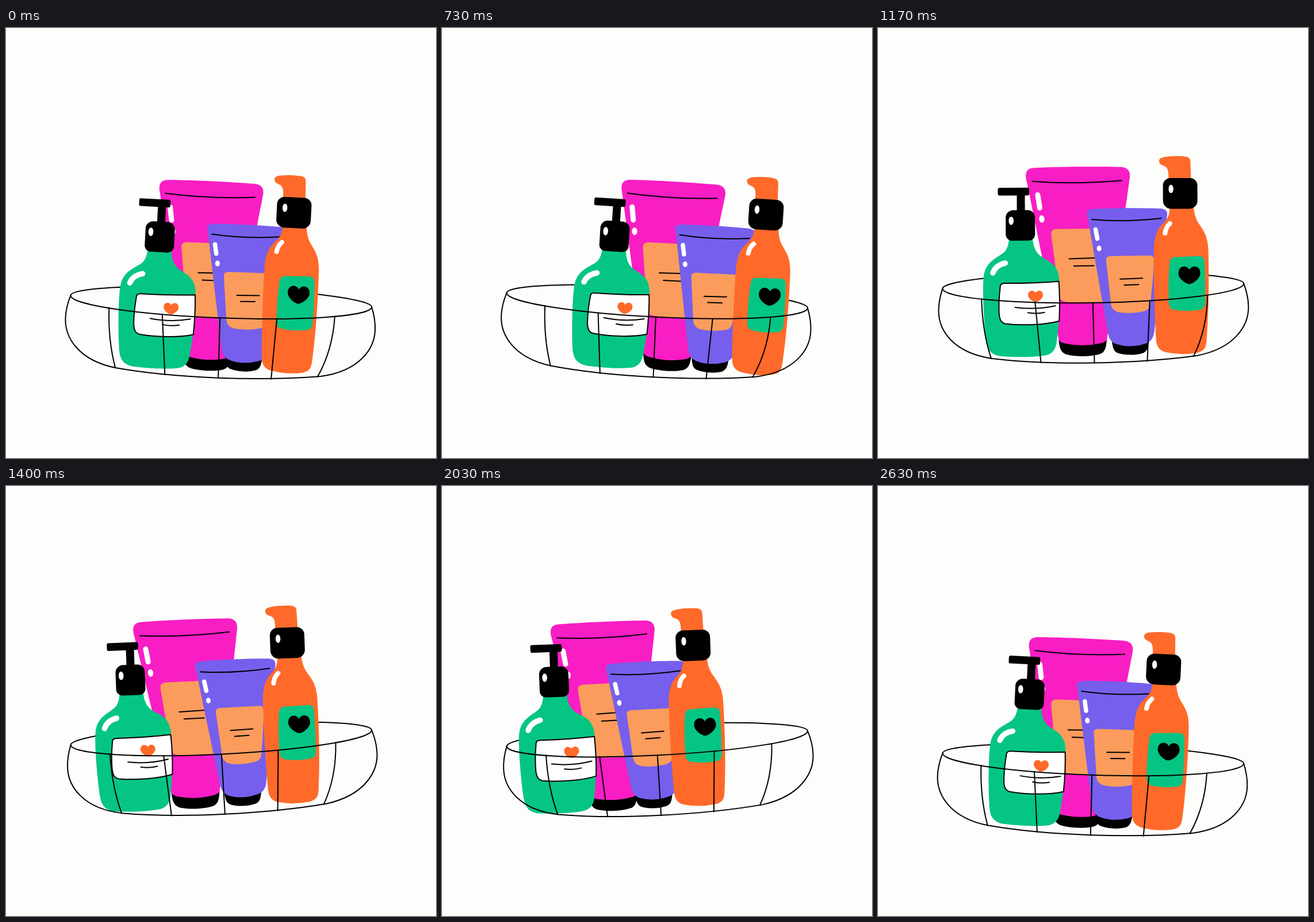
Write an HTML page with a canvas that moves like this. It is 748 px wide and 748 px high and loops after 2.66 s.

```html
<!DOCTYPE html>
<html lang="en">
<head>
<meta charset="utf-8">
<title>Rocking bowl</title>
<style>
  html, body { margin: 0; width: 100%; height: 100%; overflow: hidden; background: #fdfdfc; }
  canvas { display: block; width: 748px; height: 748px; }
</style>
</head>
<body>
<canvas id="stage" width="748" height="748"></canvas>
<script>
const ctx = document.getElementById('stage').getContext('2d');
const LOOP = 2660;
const CENTER = 374.3, REST_Y = 449.5, REST_TILT = -0.0134, RIM = 262;
const BLACK = '#000', WHITE = '#fff', GREEN = '#05c583', PINK = '#f81ec4',
      PURPLE = '#765fec', ORANGE = '#ff6a2a', PEACH = '#fb9c5c';

// Eased swing between two extremes, reached at times tHigh and tLow.
function swing(t, high, low, tHigh, tLow) {
  const since = (t - tHigh + LOOP) % LOOP;
  const fall = tLow - tHigh;
  const down = since < fall;
  const u = down ? since / fall : (since - fall) / (LOOP - fall);
  const e = u * u * (3 - 2 * u);
  return down ? high + (low - high) * e : low + (high - low) * e;
}

function fill(color, d) {
  ctx.fillStyle = color;
  ctx.fill(new Path2D(d));
}

function stroke(d, width = 2, color = BLACK) {
  ctx.strokeStyle = color;
  ctx.lineWidth = width;
  ctx.stroke(new Path2D(d));
}

function box(color, x, y, w, h, r) {
  ctx.fillStyle = color;
  ctx.beginPath();
  ctx.roundRect(x, y, w, h, r);
  ctx.fill();
}

function spot(x, y, rx, ry, tilt = -0.08) {
  ctx.fillStyle = WHITE;
  ctx.beginPath();
  ctx.ellipse(x, y, rx, ry, tilt, 0, Math.PI * 2);
  ctx.fill();
}

function heart(color, x, y, w, h) {
  ctx.save();
  ctx.translate(x, y);
  ctx.scale(w, h);
  fill(color, 'M0 -.3C-.1 -.58 -.5 -.58 -.5 -.1C-.5 .2 -.15 .5 0 .5C.15 .5 .5 .2 .5 -.1C.5 -.58 .1 -.58 0 -.3Z');
  ctx.restore();
}

function pinkTube() {
  fill(BLACK, 'M315 540C316 556 318 564 328 568C345 572.5 370 572.5 386 568C396 565 398 556 399 540Z');
  fill(PINK, 'M260.500 267C256 250 262 244 274 243.500C320 241.500 380 241.500 424 242.500C436 243 442 250 439.500 263L399 543Q396 547 388 549Q357 556 326 549Q317 547 315.500 543Z');
  stroke('M270 267Q345 273 426 266');
  stroke('M279.500 290.500L283 313', 9, WHITE);
  spot(286.500, 332.500, 4.6, 6.5);
  fill(PEACH, 'M303 362C302 354 304 350.500 312 350L404 349Q412 350 411 358L401 472Q400 477 392 477.500Q355 480 328 477Q319 475.500 317 468Z');
  stroke('M334 402L378 400.500M342 414.500L377 414');
}

function purpleTube() {
  fill(BLACK, 'M406 540C407 556 409 563 416 566C430 570.500 448 570.500 461 566C469 562 470 554 471 540Z');
  fill(PURPLE, 'M365 331C362 320 364 316 374 315.500C410 313.500 460 313.500 492 315C502 316 505 321 502.500 330L480 530C478 541 474 547 464 550Q438 558 415 551C404 547 401 540 399 530Z');
  stroke('M372 333.500Q430 339 493 332');
  stroke('M378.500 351L381.500 367', 7.5, WHITE);
  spot(384.500, 384, 4, 5);
  fill(PEACH, 'M397 408C396 400 398 398 405 397.500L472 396.500Q481 397 480 405Q478 445 473 482Q472 490 464 493Q440 499 417 495Q407 492 405 482Z');
  stroke('M421 437.500L460 436M428 448L453 447');
}

function greenBottle() {
  box(BLACK, 209.500, 278, 54.500, 13.500, 3);
  box(BLACK, 242.500, 285, 14, 40, 0);
  fill(GREEN, 'M229 364C228 376 226 385 219 391C206 401 190 406 185 428C181 450 185 520 188.500 546C191 562 199 569 214 571C238 573 270 573 290 570C303 568 309 560 311 547C315 518 319 470 315 432C312 412 300 407 288 400C276 393 270 382 270 364Z');
  box(BLACK, 223, 317, 51, 53, [13, 13, 11, 11]);
  spot(232.500, 335.500, 4.3, 7.3, 0);
  stroke('M200.500 426Q205 413 222 409', 9.5, WHITE);
  const label = 'M213 452C213 446 215 444 221 444Q270 444.500 315 441C317 465 316.500 490 315.500 510C290 517 250 518 222 514.500C214 512.500 212 507 211 497Q210 475 213 452Z';
  fill(WHITE, label);
  stroke(label);
  heart(ORANGE, 274.500, 467, 26, 20);
  stroke('M239 486Q275 491 309 483.500M261 495.500Q276 498 290 495');
}

function orangeBottle() {
  fill(ORANGE, 'M490 235C488 230 491 227 498 225.500C510 223.500 525 223.500 534 224.500C542 225.500 544 228 544 236L545 270H506C506 252 506 244 498 241Q491 239 490 235Z');
  fill(ORANGE, 'M508 308C508 325 505 332 496 341C486 351 481 362 480 385C479 430 481 500 483 541C484 556 489 562 500 565Q528 571 555 566C567 563 570 558 571 545C575 500 576 440 574.500 385C573 362 567 355 560 344C553 334 550 325 549 308Z');
  box(BLACK, 496, 262, 60, 53.500, [13, 13, 14, 14]);
  spot(510, 281, 4.2, 7.3, 0);
  stroke('M499.500 358Q501 347 508 341', 8, WHITE);
  fill(GREEN, 'M507 410C508 402 511 400 518 399.500L558 398Q567 398 568 406Q570 445 568.500 482Q567 490 559 491.500Q535 495 514 491Q506 489 505.500 480Q504 445 507 410Z');
  heart(BLACK, 541.500, 431, 38, 31);
}

// The bowl is drawn around the middle of its rim.
function bowlBack() {
  stroke(`M${-RIM} 0A${RIM} 24 0 0 1 ${RIM} 0`);
}

function bowlFront() {
  stroke(`M${-RIM} 0A${RIM} 29 0 0 0 ${RIM} 0`);
  stroke('M-262 0C-267 14 -269.500 28 -269.500 40C-269.500 72 -246 112 -178 123C-120 131 -60 133.500 0 133.500C60 133.500 120 131 178 124C246 112 269.500 72 269.500 40C269.500 28 267 14 262 0');
  stroke('M-194.500 19Q-194 76 -179.500 123M-101.500 26.500L-93 131.500M-1 29L0 133.500M98 27L92 132M198.500 19Q197 78 172.500 125');
}

const items = [
  { draw: pinkTube, slide: [43.3, -66.5, 622, 1880] },
  { draw: purpleTube, slide: [34.3, -75, 718, 1938] },
  { draw: greenBottle, slide: [50.5, -56, 550, 1828] },
  { draw: orangeBottle, slide: [28, -83.5, 780, 1980] }
];

function render(t) {
  ctx.setTransform(1, 0, 0, 1, 0, 0);
  ctx.fillStyle = '#fdfdfc';
  ctx.fillRect(0, 0, 748, 748);
  ctx.lineCap = ctx.lineJoin = 'round';

  ctx.translate(CENTER, swing(t, 484.5, 430.8, 345, 1700));
  ctx.rotate(Math.atan(swing(t, 37, -37, 425, 1713) / (2 * RIM)));
  bowlBack();
  for (const { draw, slide } of items) {
    ctx.save();
    ctx.translate(swing(t, ...slide), 0);
    ctx.rotate(-REST_TILT);
    ctx.translate(-CENTER, -REST_Y);
    draw();
    ctx.restore();
  }
  bowlFront();
}

const start = performance.now();
function tick() {
  render((performance.now() - start) % LOOP);
  requestAnimationFrame(tick);
}
tick();
</script>
</body>
</html>
```
